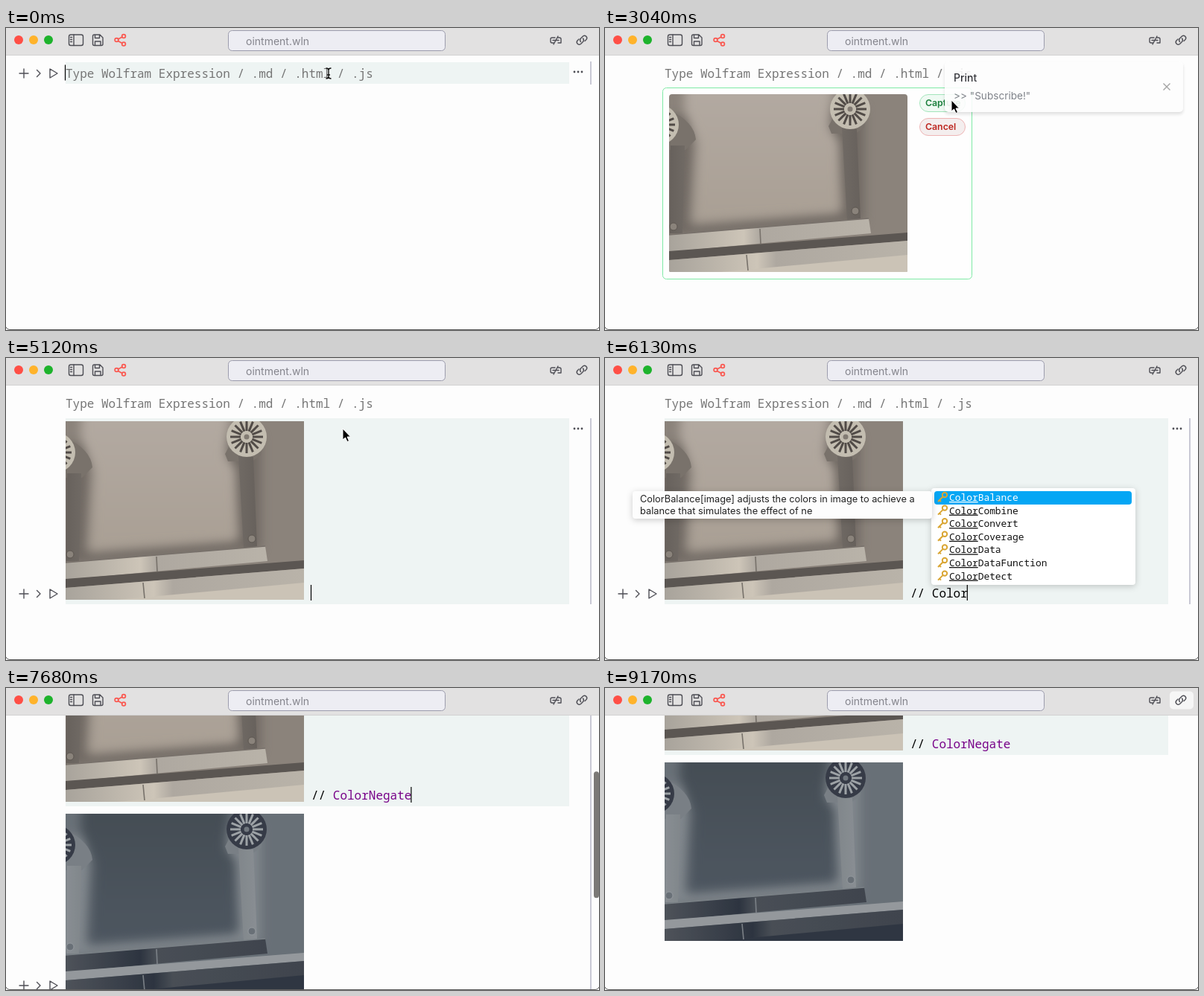
An HTML page for the animation above (9.22 s loop, 796 px wide and 406 px high).

```html
<!DOCTYPE html>
<html lang="en">
<head>
<meta charset="utf-8">
<title>Notebook camera demo</title>
<style>
html, body { margin: 0; width: 100%; height: 100%; overflow: hidden; background: #fdfdfd; }
svg { display: block; }
text { white-space: pre; }
.ui { font-family: Inter, sans-serif; }
.code { font-family: "Noto Sans Mono", monospace; }
.line { fill: none; stroke: #4e4e55; stroke-width: 1.4; stroke-linecap: round; stroke-linejoin: round; }
.cell { fill: #eef4f3; }
.negative { filter: invert(1) brightness(.9); }
.float { filter: drop-shadow(0 2px 4px #0003); }
.soft { filter: blur(7px); }
</style>
</head>
<body>
<svg width="796" height="406" viewBox="0 0 796 406">
  <defs>
    <linearGradient id="wall" x2="0" y2="1">
      <stop offset="0" stop-color="#b3aaa2"/><stop offset="1" stop-color="#a99f94"/>
    </linearGradient>
    <linearGradient id="pipe">
      <stop offset="0" stop-color="#67615c"/><stop offset=".45" stop-color="#99938b"/><stop offset="1" stop-color="#67615c"/>
    </linearGradient>
    <linearGradient id="steel">
      <stop offset="0" stop-color="#a8a39b"/><stop offset=".37" stop-color="#cdc5b8"/><stop offset=".45" stop-color="#aea8a0"/><stop offset="1" stop-color="#b9b3a9"/>
    </linearGradient>
    <clipPath id="frame"><rect width="320" height="240"/></clipPath>
    <clipPath id="rounded"><rect width="320" height="240" rx="4"/></clipPath>
    <g id="vent"><circle r="27" fill="#c3bdb0"/><g id="spokes" stroke="#514b47" stroke-width="3"/><circle r="3.5" fill="#827b73"/></g>
    <g id="photo" clip-path="url(#frame)">
      <rect width="320" height="240" fill="#8b837b"/>
      <path class="soft" d="M-10 30H34L26 190H-10ZM210 20H262V172L20 190V178L232 158Z" fill="#706963"/>
      <path class="soft" d="M22-20H222L214 46L228 64L230 160L32 174L38 66L20 20Z" fill="url(#wall)"/>
      <path d="M0 22Q34 38 36 62L22 76H0ZM214 44L225 24H266L262 46L250 54H218Z" fill="#79726b"/>
      <path d="M2 70H21L18 188H1ZM232 46L252 48L257 168L239 171Z" fill="url(#pipe)"/>
      <use href="#vent" x="-14" y="42"/>
      <use href="#vent" x="243" y="21"/>
      <g fill="#8a837b" stroke="#5d5751"><circle cx="250" cy="158" r="5"/><circle cx="6" cy="179" r="5"/></g>
      <path d="M0 190L268 168L271 188L0 213Z" fill="url(#steel)"/>
      <path d="M0 190L268 168" stroke="#77706a" stroke-width="1.5"/>
      <path d="M0 212L320 187V198L0 224Z" fill="#5b5652"/>
      <path d="M0 224L320 198V240H0Z" fill="url(#steel)"/>
      <path d="M70 240L320 217V240Z" fill="#cbc3b6"/>
      <path d="M122 182L123 202M104 217L106 238" stroke="#77716a" stroke-width="1.6"/>
    </g>
    <g id="key" fill="none" stroke="#d9a532" stroke-width="2"><circle cx="9" cy="-9" r="3.2"/><path d="M7-7L0 0M2-2L4 0"/></g>
  </defs>
  <rect width="796" height="406" fill="#fdfdfd"/>

  <g id="page">
    <rect id="emptyCell" class="cell" x="80" y="46" width="676" height="29"/>
    <text class="code" x="80" y="66.500" font-size="16" fill="#757575">Type Wolfram Expression / .md / .html / .js</text>

    <g id="camera">
      <rect x="77.500" y="80.500" width="415" height="257" rx="5" fill="#fefefe" stroke="#7eeaa5"/>
      <g transform="translate(86 89)"><g clip-path="url(#rounded)"><use href="#photo" y="-1"/></g></g>
      <g class="ui" font-size="12.3" font-weight="600">
        <rect x="422.5" y="89.5" width="61" height="23" rx="11.5" fill="#effaf3" stroke="#a3e5bb"/>
        <text x="430" y="105" fill="#1b7f3c">Capture</text>
        <rect x="422.5" y="121.5" width="61" height="23" rx="11.5" fill="#f4eeee" stroke="#eeb5b5"/>
        <text x="430" y="137" fill="#bd2720">Cancel</text>
      </g>
    </g>

    <g id="editor">
      <rect class="cell" x="80" y="81" width="676" height="250"/>
      <use href="#photo" x="80" y="85"/>
      <text class="code" x="410" y="321.500" font-size="16" font-weight="500"><tspan id="slashes"></tspan><tspan id="symbol"></tspan></text>
    </g>
    <use id="output" class="negative" href="#photo" x="80" y="341"/>
    <path id="caret" d="M0 0V21" stroke="#000" stroke-width="1.2"/>

    <g id="controls" class="line">
      <path d="M18 0H30M24-6V6M59-6V6L69 0Z"/>
      <path id="chevron"/>
    </g>
    <g id="cellEdge">
      <rect id="bar" x="784" width="2" fill="#c9c9d5"/>
      <g id="dots" fill="#4e4e55"><circle cx="763" r="1.4"/><circle cx="768" r="1.4"/><circle cx="773" r="1.4"/></g>
    </g>

    <g id="popup">
      <rect class="float" x="438" y="175" width="274" height="130" rx="4" fill="#fff"/>
      <rect x="442" y="179" width="265" height="18" rx="4" fill="#05a6f4"/>
      <g id="options" class="code" font-size="12.9"></g>
      <rect class="float" x="37" y="179" width="402" height="37" rx="4" fill="#fdfdfd"/>
      <g class="ui" font-size="12.8" fill="#222"><text id="hint1" x="47" y="194"></text><text id="hint2" x="47" y="210"></text></g>
    </g>
  </g>

  <rect id="thumb" x="789" width="7" height="170" rx="3.5" fill="#7b7976"/>

  <g id="toast" class="ui">
    <rect x="456" y="45" width="320" height="68" rx="5" fill="#fefefe" style="filter: drop-shadow(0 3px 2px #0002)"/>
    <text x="468" y="72" font-size="14" font-weight="500" fill="#202127">Print</text>
    <text x="468" y="96" font-size="13.600" fill="#70747c">&gt;&gt; "Subscribe!"</text>
    <path d="M749.5 74.5l9 9m0-9l-9 9" stroke="#999" stroke-width="1.4"/>
  </g>

  <rect width="796" height="37" fill="#e2e1e1"/>
  <path d="M0 36.5H796" stroke="#d2d1d1"/>
  <circle cx="17" cy="16" r="6" fill="#ff4f46"/><circle cx="37" cy="16" r="6" fill="#ffb32b"/><circle cx="57" cy="16" r="6" fill="#1db32c"/>
  <g class="line">
    <rect x="84.5" y="9" width="19" height="14.5" rx="2.5"/><path d="M91 9V23.500M86.500 12.500h2m-2 3h2m-2 3h2"/>
    <path d="M116.500 11a2 2 0 0 1 2-2H126l4 4V21.500a2 2 0 0 1-2 2h-9.500a2 2 0 0 1-2-2ZM119.500 9v4.500h6V9M119.500 23.500V18h7.500v5.500"/>
    <g stroke="#fa5850" stroke-width="1.7"><path d="M150.500 15L156 12M150.500 17.500L156 20.500"/><circle cx="148.500" cy="16" r="2.400"/><circle cx="158" cy="11" r="2.400"/><circle cx="158" cy="21.500" r="2.400"/></g>
    <path d="M737 13h-4a2 2 0 0 0-2 2v3a2 2 0 0 0 2 2h2M741 13h2a2 2 0 0 1 2 2v5h-4M734 16.500h8M735 22l6-11"/>
    <rect id="hover" x="758" y="4.500" width="32" height="24" rx="5" fill="#f6f6f6" stroke="none"/>
    <path d="M771.500 18.500a3.400 3.400 0 0 1 0-4.500l3-3a3.200 3.200 0 0 1 4.500 4.500l-2 2M774.500 14a3.400 3.400 0 0 1 0 4.500l-3 3a3.200 3.200 0 0 1-4.500-4.500l2-2"/>
  </g>
  <rect x="298.500" y="3.500" width="291" height="27" rx="5" fill="#ededf3" stroke="#9c9cad"/>
  <text class="ui" x="322" y="22.500" font-size="14" fill="#85858d">ointment.wln</text>
  <path d="M0 402Q1 405.500 5 405.500H791Q795 405.500 796 402" fill="none" stroke="#5c5c5c"/>

  <path id="beam" d="M-3.500-7Q0-7 0-4.500Q0-7 3.500-7M0-4.500V4.500M-3.500 7Q0 7 0 4.500Q0 7 3.500 7M-2 2H2" fill="none" stroke="#111" stroke-width="1.4"/>
  <path id="arrow" d="M0-8V7L3.500 4L6 9.500L8.500 8.400L6 3H10.500Z" fill="#000" stroke="#fff"/>
</svg>
<script>
const LOOP = 9220;
const AT = { open: 1200, capture: 4850, type: 5250, accept: 6700, evaluate: 7100, scroll: 7350, blur: 8600, hover: 8900 };
const KEY_DELAY = 110, CHAR = 9.6, MAX_SCROLL = 241, SCROLL_TIME = 968;
const POINTER = [[210, 433, 61], [700, 490, 95], [2000, 552, 130], [2500, 552, 130], [2980, 465, 105],
  [3400, 465, 105], [4200, 624, 188], [4350, 624, 188], [4720, 452, 103]];
const NAMES = ["Balance", "Combine", "Convert", "Coverage", "Data", "DataFunction", "Detect", "Negate"].map(n => "Color" + n);
const HINTS = {
  ColorBalance: ["ColorBalance[image] adjusts the colors in image to achieve a", "balance that simulates the effect of ne"],
  ColorNegate: ["ColorNegate[image] gives the negative of image, in which", "all colors have been negated"]
};

const $ = id => document.getElementById(id);
const show = (id, on) => $(id).style.display = on ? "" : "none";
const move = (id, x, y) => $(id).setAttribute("transform", `translate(${x} ${y})`);
const set = (id, name, value) => $(id).setAttribute(name, value);
const clamp = v => Math.max(0, Math.min(1, v));
const ramp = (t, from, to) => clamp((t - from) / (to - from));

$("spokes").innerHTML = Array.from({ length: 16 }, (_, i) => `<path d="M8 0H22" transform="rotate(${i * 22.5})"/>`).join("");

function pointerAt(t) {
  let [, x, y] = POINTER[0];
  for (let i = 1; i < POINTER.length; i++) {
    const [t0, x0, y0] = POINTER[i - 1], [t1, x1, y1] = POINTER[i];
    if (t < t0) break;
    const p = ramp(t, t0, t1), e = p * p * (3 - 2 * p);
    x = x0 + (x1 - x0) * e;
    y = y0 + (y1 - y0) * e;
  }
  return [x, y];
}

let lastPrefix = "";
function complete(prefix) {
  if (prefix === lastPrefix) return;
  lastPrefix = prefix;
  const found = NAMES.filter(n => n.startsWith(prefix)).slice(0, 7);
  $("options").innerHTML = found.map((name, i) => {
    const y = 192 + i * 17.6;
    return `<use href="#key" x="447" y="${y + 1}"/><text x="462" y="${y}" fill="${i ? "#111" : "#fff"}">` +
      `<tspan text-decoration="underline">${prefix}</tspan>${name.slice(prefix.length)}</text>`;
  }).join("");
  [$("hint1").textContent, $("hint2").textContent] = HINTS[found[0]];
}

function draw(t) {
  const opened = t >= AT.open, captured = t >= AT.capture, evaluated = t >= AT.evaluate;
  const camera = opened && !captured, focused = t < AT.blur;

  show("emptyCell", !opened);
  show("camera", camera);
  show("editor", captured);
  show("output", evaluated);

  const accepted = t >= AT.accept;
  const count = Math.max(0, Math.min(11, Math.floor((t - AT.type) / KEY_DELAY)));
  const typed = accepted ? "// ColorNegate" : "// ColorNegate".slice(0, count);
  const word = typed.slice(3);
  $("slashes").textContent = typed.slice(0, 3);
  $("symbol").textContent = word;
  set("symbol", "fill", accepted ? "#770088" : "#000");
  const popup = captured && word.length > 1 && !accepted;
  show("popup", popup);
  if (popup) complete(word);

  show("caret", focused && (captured || !opened && (t + 480) % 1060 < 530));
  move("caret", captured ? 409.5 + typed.length * CHAR : 79.5, captured ? 305 : 49.5);

  // Gutter and right edge follow the active cell.
  const toast = Math.min(ramp(t, 2880, 3060), 1 - ramp(t, 3700, 3900));
  const active = focused && !(t > 2900 && t < 3900);
  const [top, bottom, gutter] = evaluated ? [81, 581, 572] : captured ? [81, 331, 317] : camera ? [81, 338, 323] : [45, 76, 61];
  show("controls", active);
  show("cellEdge", active);
  move("controls", 0, gutter);
  set("chevron", "d", camera ? "M39.5-2L44 2.500L48.500-2" : "M41.500-4.500L46 0L41.500 4.500");
  set("bar", "y", top);
  set("bar", "height", bottom - top);
  move("dots", 0, opened ? 95 : 59);

  const scroll = MAX_SCROLL * (1 - (1 - ramp(t, AT.scroll, AT.scroll + SCROLL_TIME)) ** 3);
  move("page", 0, -Math.round(scroll));
  show("thumb", t > AT.scroll && t < AT.blur);
  set("thumb", "y", 39 + scroll * 0.425);

  show("toast", toast > 0);
  set("toast", "opacity", toast);
  show("hover", t >= AT.hover);

  const [x, y] = pointerAt(t), overText = y < 75;
  show("beam", overText);
  show("arrow", !overText && t < AT.type);
  move("beam", x, y);
  move("arrow", x, y);
}

function tick() {
  draw(performance.now() % LOOP);
  requestAnimationFrame(tick);
}
tick();
</script>
</body>
</html>
```
